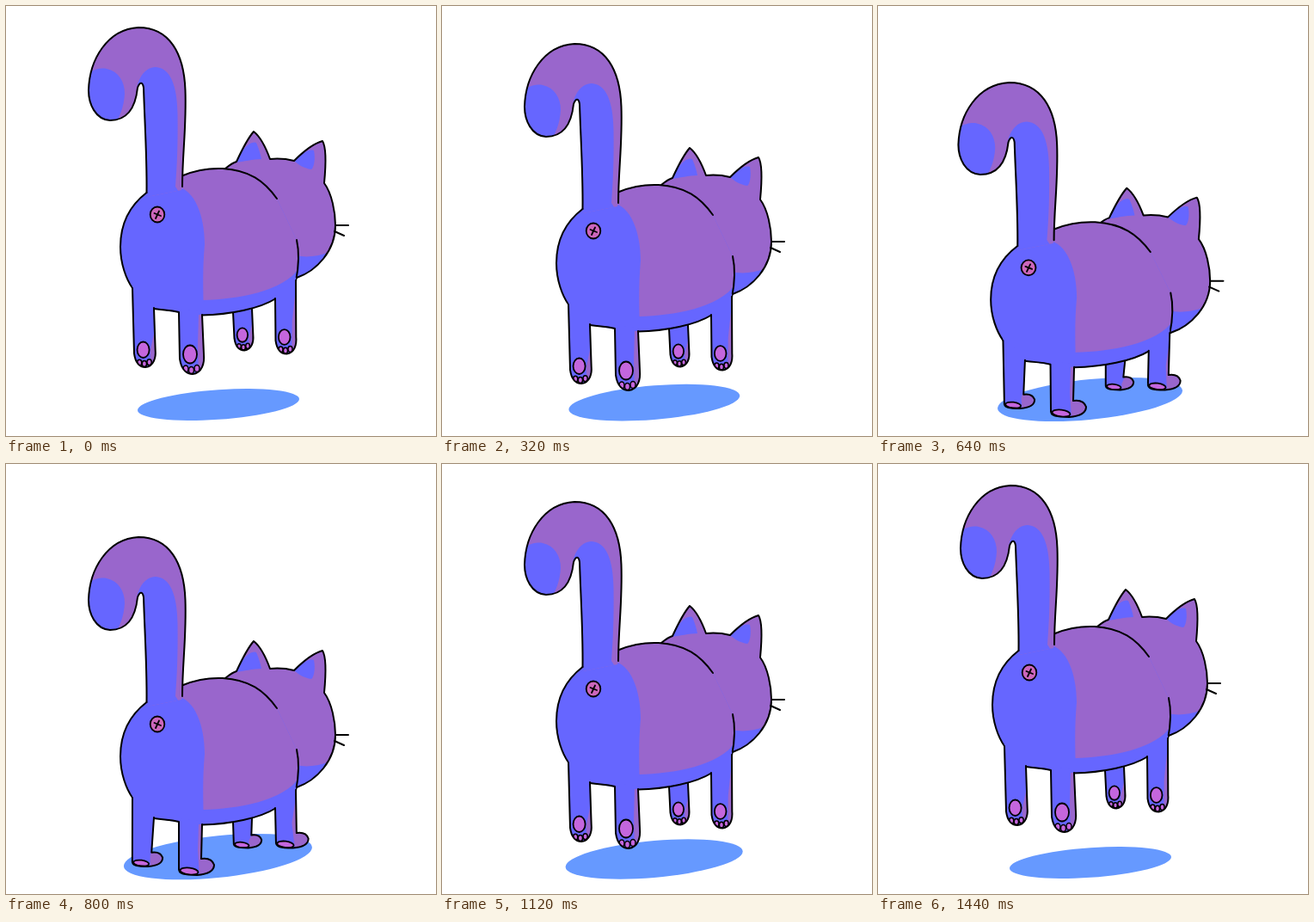
Animation, 500 px wide and 500 px high, one loop 1600 ms. Source, as an HTML page with a canvas:

```html
<!DOCTYPE html>
<html lang="en">
<head>
<meta charset="utf-8">
<title>Bouncing cat</title>
<style>
html, body { margin: 0; width: 100%; height: 100%; overflow: hidden; background: #fff; }
canvas { display: block; width: 500px; height: 500px; }
</style>
</head>
<body>
<canvas id="stage" width="500" height="500"></canvas>
<script>
const ctx = document.getElementById('stage').getContext('2d');
const PURPLE = '#9966cc', BLUE = '#6666ff', SHADE = '#6699ff', INK = '#000';
const PAD = '#c466dd', PINK = '#cc66bb';
const STEP = 160;

// drop: body offset, grow: shadow size, foot: pose of the feet
const STEPS = [
  { drop: 0, grow: 0, foot: 'hang' },
  { drop: 2, grow: 0.2, foot: 'hang' },
  { drop: 19, grow: 0.4, foot: 'hang' },
  { drop: 51, grow: 0.7, foot: 'tip' },
  { drop: 64.25, grow: 1, foot: 'flat', squash: true },
  { drop: 60, grow: 1.15, foot: 'flat' },
  { drop: 51, grow: 1, foot: 'tip' },
  { drop: 19, grow: 0.67, foot: 'hang' },
  { drop: 2, grow: 0.4, foot: 'hang' },
  { drop: 0, grow: 0, foot: 'hang' }
];

const p = d => new Path2D(d);

const HEAD = 'M255 189C260 185 264 182 268 181C274 168 281 154 288 146C297 153 303 167 307 178' +
  'C317 177 327 178 335 180C345 170 357 160 368 157C373 165 372 185 370 206' +
  'C379 218 383 240 383 255C383 285 361 308 338 316';
const TAIL = 'M163.5 217C164 175 161 130 160 95C159 89 156 87 153 95C151 114 144 133 121 133' +
  'C104 132 96 114 96 98C97 62 118 27 154 25C190 25 207 55 208.5 98C210 140 205 172 205 210';
const BACK = 'M206 197C225 189 240 188.500 252 189C283 191 300 203 315 224';
const RUMP = 'M163.500 217C140 235 133 258 133 280C133 300 140 318 147 328';
const SIDE = 'M338 272C342 290 340 305 337 320';

const cat = {
  head: p(HEAD),
  headFill: p(HEAD + 'L300 290L255 230Z'),
  jaw: p('M338 290C348 293 363 291 374 287L390 287L390 320L330 320Z'),
  earL: p('M267 182C275 165 285 156 291 159C294 166 296 172 297 178C287 178 276 181 267 182Z'),
  earR: p('M335 180C345 171 352 166 358 168C360 178 358 188 355 190C347 189 339 184 335 180Z'),
  tail: p(TAIL),
  tailFill: p(TAIL + 'L204 214L164 222Z'),
  tip: p('M90 82C103 72 112 72 117 73C131 76 138 88 138 102C137 119 132 128 126 140L90 140Z'),
  stem: p('M152 100C152 86 161 71 174 71C191 72 199 92 199.500 125C200 160 199 185 197 210L205 222L160 222Z'),
  bodyFill: p(RUMP + 'L172 352C185 353 190 356 201 356L228 359.500C260 359 295 352 314 340L337 320' +
    'C340 305 342 290 338 272L315 224C300 203 283 191 252 189C240 188.500 225 189 206 197L205 211Z'),
  flank: p('M198 210C220 213 231 245 231 277C229 300 229 320 229.500 342C268 341 324 332 341 304' +
    'L345 270L330 175L204 175Z'),
  lines: p(BACK + RUMP + SIDE + 'M172 352C185 354 190 353 201 356M228 359.500C260 359 295 352 314 340'),
  whiskers: p('M383 255L398 255M382 262L393 267'),
  cross: p('M172.500 241L180 244M178 238.500L174 247')
};

// outline of a foot, relative to heel x and sole y; pad is x, y, rx, ry, tilt
const FEET = {
  hang: {
    start: [0, -18],
    curves: [[2, -4, 9, 0, 15, 0], [26, -1, 29, -13, 28, -23]],
    pad: [12, -23, 8, 10.5, 0],
    toes: [[7, -6], [13.5, -4.5], [20, -6.5]]
  },
  tip: {
    start: [0, -22],
    curves: [[3, -8, 19, 0, 29, 0], [38, -1, 40, -9, 35, -15], [28, -21, 27, -26, 27, -30]],
    pad: [13, -14, 9, 6, 0.55],
    toes: [[22, -4.5], [28, -3], [34, -5]]
  },
  flat: {
    start: [1, -8],
    curves: [[0, -1, 8, 0, 22, 0], [36, -1, 42, -6, 42, -12], [40, -18, 34, -20, 27, -19]],
    pad: [13, -4.5, 10.5, 4, 0.12],
    toes: []
  }
};

// left/right: top of each edge; each pose gives heel x, sole y, size
const LEGS = [
  { left: [147, 328], right: [172, 351], lit: 30,
    hang: [149, 420, 0.88], tip: [148, 467.5, 0.88], flat: [146, 468, 0.86] },
  { left: [201, 356], right: [228, 359], lit: 0,
    hang: [202, 428, 1], tip: [201, 473, 1], flat: [200, 478, 1] },
  { left: [264, 356], right: [286, 352], lit: 18,
    hang: [265.5, 400.5, 0.78], tip: [263, 445, 0.8], flat: [264, 446.5, 0.79] },
  { left: [313, 340], right: [337, 319], lit: 8,
    hang: [313.5, 404.5, 0.85], tip: [311, 446, 0.88], flat: [313, 446.5, 0.92] }
];

function fill(path, color) {
  ctx.fillStyle = color;
  ctx.fill(path);
}

function stroke(path, width = 2) {
  ctx.lineWidth = width;
  ctx.stroke(path);
}

function clipped(path, draw) {
  ctx.save();
  ctx.clip(path);
  draw();
  ctx.restore();
}

function oval(x, y, rx, ry, tilt = 0) {
  const path = new Path2D();
  path.ellipse(x, y, rx, ry, tilt, 0, Math.PI * 2);
  return path;
}

function place(step, [x, y]) {
  return step.squash
    ? [225 + (x - 225) * 1.02, y * 0.99 + step.drop]
    : [x, y + step.drop];
}

function drawShadow(g) {
  ctx.save();
  ctx.translate(247 - g * 0.5, 463.5 - g * 6);
  ctx.transform(1, -0.069 - 0.026 * g, 0, 1, 0, 0);
  fill(oval(0, 0, 94 + 13.5 * g, 17.3 + 6.2 * g), SHADE);
  ctx.restore();
}

function drawLeg(step, leg) {
  const foot = FEET[step.foot];
  const [ax, ay, s] = leg[step.foot];
  // hanging feet travel with the body, the others stand on the ground
  const fall = step.foot === 'hang' ? step.drop : 0;
  const at = (x, y) => [ax + x * s, ay + fall + y * s];
  const [lx, ly] = place(step, leg.left);
  const [rx, ry] = place(step, leg.right);
  const line = new Path2D();
  line.moveTo(lx, ly);
  line.lineTo(...at(...foot.start));
  for (const c of foot.curves) {
    line.bezierCurveTo(...at(c[0], c[1]), ...at(c[2], c[3]), ...at(c[4], c[5]));
  }
  line.lineTo(rx, ry);
  const shape = new Path2D(line);
  shape.lineTo(rx, ry - 4);
  shape.lineTo(lx, ly - 4);
  shape.closePath();

  fill(shape, BLUE);
  clipped(shape, () => {
    const [ex, ey] = at(step.foot === 'hang' ? 22 : 25, 2);
    const strip = new Path2D();
    strip.moveTo(rx - (leg.lit ? 0 : 4), ry + leg.lit);
    strip.lineTo(rx - 5 * s, (ry + leg.lit + ey) / 2);
    strip.lineTo(ex, ey);
    strip.lineTo(ex + 30, ey);
    strip.lineTo(ex + 30, ry + leg.lit);
    strip.closePath();
    fill(strip, PURPLE);

    const [x, y, w, h, tilt] = foot.pad;
    const pads = [oval(...at(x, y), w * s, h * s, tilt)];
    for (const t of foot.toes) pads.push(oval(...at(...t), 3 * s, 4 * s));
    pads.forEach((pad, i) => {
      fill(pad, PAD);
      stroke(pad, i ? 1.5 : 1.8);
    });
  });
  stroke(line);
}

function drawHead(step) {
  ctx.save();
  if (step.squash) ctx.translate(0, 3);
  fill(cat.headFill, PURPLE);
  clipped(cat.headFill, () => {
    fill(cat.jaw, BLUE);
    fill(cat.earL, BLUE);
    fill(cat.earR, BLUE);
  });
  stroke(cat.head);
  stroke(cat.whiskers);
  ctx.restore();
}

function drawBody() {
  fill(cat.bodyFill, BLUE);
  clipped(cat.bodyFill, () => fill(cat.flank, PURPLE));
  fill(cat.tailFill, PURPLE);
  clipped(cat.tailFill, () => {
    fill(cat.tip, BLUE);
    fill(cat.stem, BLUE);
  });
  stroke(cat.tail);
  stroke(cat.lines);
  const button = oval(176, 242.5, 8.3, 9);
  fill(button, PINK);
  stroke(button, 1.8);
  stroke(cat.cross, 1.8);
}

function inBody(step, draw) {
  ctx.save();
  if (step.squash) ctx.transform(1.02, 0, 0, 0.99, -4.5, step.drop);
  else ctx.translate(0, step.drop);
  draw(step);
  ctx.restore();
}

function render(now) {
  const step = STEPS[Math.floor(now / STEP) % STEPS.length];
  ctx.fillStyle = '#fff';
  ctx.fillRect(0, 0, 500, 500);
  ctx.strokeStyle = INK;
  ctx.lineCap = ctx.lineJoin = 'round';
  drawShadow(step.grow);
  drawLeg(step, LEGS[2]);
  inBody(step, drawHead);
  inBody(step, drawBody);
  for (const i of [3, 0, 1]) drawLeg(step, LEGS[i]);
}

const begin = performance.now();
function tick() {
  render(performance.now() - begin);
  requestAnimationFrame(tick);
}
tick();
</script>
</body>
</html>
```
